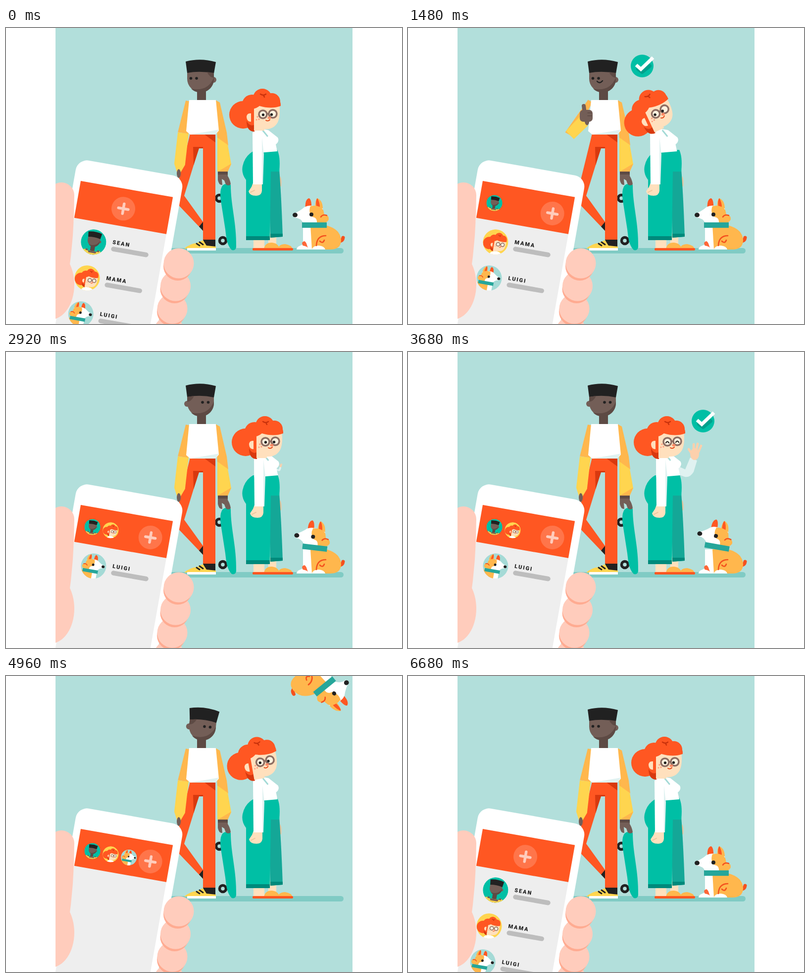
An HTML page for the animation above (6720 ms loop, 800 by 600 pixels).

```html
<!DOCTYPE html>
<html lang="en">
<head>
<meta charset="utf-8">
<title>Add to group</title>
<style>
html, body { margin: 0; width: 100%; height: 100%; overflow: hidden; background: #fff; }
svg { display: block; width: 100%; height: 100%; }
text { font: 900 11px Roboto, Arial, sans-serif; letter-spacing: 2px; fill: #212121; }
.o { fill: #ff5722 } .t { fill: #00bfa5 } .y { fill: #ffd54f } .a { fill: #ffb74d }
.w { fill: #fff } .k { fill: #212121 } .b { fill: #735e57 } .d { fill: #5d4a44 }
.s { fill: #ffe0bd } .p { fill: #ffccbc } .pale { fill: #e0f2f1 } .r { fill: #d8390f }
.line { fill: none; stroke-linecap: round; stroke-linejoin: round; }
</style>
</head>
<body>
<svg viewBox="0 0 800 600">
<defs>
  <clipPath id="panel"><path d="M100 0H700V600H100z"/></clipPath>
  <clipPath id="disc"><circle r="25.5"/></clipPath>
  <g id="tick">
    <circle class="t" r="23"/>
    <path class="line" d="M-8 6L0 12L15 0" stroke="#00a08c" stroke-width="8"/>
    <path d="M-12 -2L-2.5 6.500L22 -17" fill="none" stroke="#fff" stroke-width="7"/>
  </g>
  <g id="av0" clip-path="url(#disc)">
    <circle class="t" r="26"/>
    <g transform="scale(.46) translate(-393 -110)">
      <path class="d" d="M384 128H403V170H384z"/>
      <path class="y" d="M352 148L364 145V150H424V145L436 150V175H352z"/>
      <path class="b" d="M364 143H372L378 158H410L416 143H424V150H364z"/>
      <circle class="b" cx="420" cy="105" r="6"/><use href="#skull"/>
    </g>
  </g>
  <g id="av1" clip-path="url(#disc)">
    <circle class="y" r="26"/>
    <ellipse class="w" cx="5" cy="27" rx="13" ry="9"/>
    <use href="#momFace" transform="scale(.45) translate(-506 -167)"/>
  </g>
  <g id="av2" clip-path="url(#disc)">
    <circle r="26" fill="#a4dad6"/>
    <g transform="scale(-.62 .62) translate(-615 -382)">
      <path class="w" d="M601 400H622V440H601z"/><path class="a" d="M616 400H652V440H616z"/>
      <use href="#dogFace"/><path d="M598 394H648V405H598z" fill="#26a69a"/>
    </g>
  </g>
</defs>

<g clip-path="url(#panel)">
<path d="M100 0H700V600H100z" fill="#b2dfdb"/>
<rect x="300" y="446" width="382" height="11" rx="5.500" fill="#80cbc4"/>

<!-- Sean -->
<g>
  <g fill="#b2dfdb" stroke="#212121" stroke-width="5.500"><circle cx="431" cy="345" r="6.500"/><circle cx="438" cy="431" r="6.500"/></g>
  <path class="t" d="M434 327Q437 315 446 316L454 318C454 360 466 395 465 444Q464 452 456 450C446 440 445 425 443 408L434 350Q432 337 434 327z"/>
  <path class="b" d="M428 290H448V300Q453 308 454 317Q449 321 444 317L441 309L436 306L437 318Q430 319 428 308z"/>
  <path class="d" d="M428 290H448V297H428z"/>
  <path class="o" d="M372 214L346 320L338 348L398 411V393L360 340L390 242H398V430H423V214z"/>
  <path class="r" d="M378 241H398V244H390L379 278zM400 215H423V232z"/>
  <path class="k" d="M390 402.500L398 393V411zM398 429H423V444H403z"/>
  <path class="y" d="M360 447Q372 437 385 436L398 430L405 441L424 443V447z"/>
  <path class="w" d="M366 446H424V451H366z"/>
  <path class="line" d="M385 437L391 441M391 434L398 439" stroke="#212121" stroke-width="3"/>
  <path class="a" d="M423 146L432 151L446 212L449 238L427 224z"/>
  <path class="y" d="M427 222L448 237L455 276L448 291H427z"/>
  <path class="a" d="M428 291L455 275L448 291z"/>
  <path class="d" d="M386 122H404V148H386z"/>
  <path id="upper" class="a"/>
  <path class="w" d="M370 146H424L430 208L423 216H372L364 209z"/>
  <path class="pale" d="M373 216L430 206L423 216z"/>
  <g id="seanHead">
    <circle id="ear" class="b" cy="105" r="6"/>
    <g id="skull">
      <path class="b" d="M366 86H420V103A27 27 0 0 1 366 103z"/>
      <path class="d" d="M420 100V103A27 27 0 0 1 374 123Q408 130 420 100z"/>
      <path class="k" d="M363 68Q393 60 424 69L420 92Q393 86 366 91z"/>
    </g>
    <path id="hairR" class="d" d="M406 89L420 91V101Q411 100 406 89z"/>
    <path id="hairL" class="d" d="M380 89L366 91V101Q375 100 380 89z"/>
    <g id="eyes" class="k"><circle cx="373.500" cy="102" r="2.800"/><circle cx="385" cy="102" r="2.800"/></g>
    <path id="smile" class="line" d="M382 108Q387 114 393 107" stroke="#212121" stroke-width="2.400"/>
  </g>
  <path id="sleeve" class="y"/>
  <ellipse id="palm" class="b"/>
  <g id="fist">
    <rect class="b" x="347" y="166" width="26" height="24" rx="7"/>
    <path class="line" d="M355 158L357 172" stroke="#735e57" stroke-width="8"/>
    <path class="line" d="M363 172H371M363 178H371" stroke="#5d4a44" stroke-width="1.500"/>
  </g>
</g>

<!-- Mama -->
<g>
  <path class="s" d="M500 425H522V448H500zM530 415H546V440H530z"/>
  <path fill="#e8c39c" d="M552 300Q558 302 556 321H552z"/>
  <path fill="#14a797" d="M530 260H550Q556 330 559 423L534 425z"/>
  <path class="t" d="M499 250L548 247Q555 262 552 291H535L533 430H485V308Q475 295 478 280Q482 260 499 250z"/>
  <path fill="#00897b" d="M485 422H533V430H485zM534 417H559V423L534 425z"/>
  <path class="a" d="M521 448Q523 435 537 435Q550 436 553 448zM549 448Q551 438 564 438Q577 440 579 448z"/>
  <rect class="o" x="498" y="446" width="82" height="5" rx="2"/>
  <g id="waveArm">
    <path class="pale" d="M538 228L560 238L570 214L584 220L577 243Q570 255 559 253L540 246z"/>
    <g id="waveHand"><ellipse fill="#fcd0ac" cx="579" cy="207" rx="9" ry="12"/>
    <path class="line" d="M573 206L567 197M577 201V187M582 201L585 186M586 204L592 190" stroke="#fcd0ac" stroke-width="4.500"/></g>
  </g>
  <g id="torso">
    <path class="w" d="M500 207Q515 203 530 207L549 222Q553 230 545 236L548 250L500 254z"/>
    <path class="line" d="M519 208L528 219" stroke="#a4dad6" stroke-width="3"/>
  </g>
  <g id="momArm">
    <path class="s" d="M499 314H517V330Q516 340 505 340Q492 340 490 331L496 322z"/>
    <path class="line" d="M494 333L502 329" stroke="#f0c9a0" stroke-width="2"/>
    <path class="w" d="M498 212Q508 204 518 214L519 317H499z"/>
    <path class="pale" d="M517 222L521 256L519 317H517z"/>
  </g>
  <g id="momHead">
    <g id="momFace">
      <g class="o"><circle cx="479" cy="176" r="28"/><circle cx="497" cy="155" r="20"/><circle cx="518" cy="142" r="19"/><circle cx="537" cy="149" r="17"/>
      <path d="M484 150H504V208Q488 210 484 192z"/></g>
      <path class="r" d="M486 188Q492 201 502 196V210Q486 210 486 188z"/>
      <path class="s" d="M501 154H552Q555 178 549 191Q541 206 522 205V208H501z"/>
      <path class="o" d="M500 164Q506 163 512 158Q536 165 555 158Q556 142 538 134H505Q496 150 500 164z"/>
      <path class="s" d="M495 173Q486 172 486 181Q487 190 495 190z"/>
      <g fill="#fff3e0" stroke="#8d6e63" stroke-width="3.500"><circle cx="519" cy="175" r="8"/><circle cx="539" cy="174" r="8"/></g>
      <path class="line" d="M527 174H531" stroke="#8d6e63" stroke-width="3.500"/>
      <ellipse cx="532" cy="182" rx="3.500" ry="2.500" fill="#ff8a65"/>
      <path class="line" d="M525 187Q529 190 533 186" stroke="#e64a19" stroke-width="2"/>
      <g fill="#ff9e80"><circle cx="508" cy="180" r="1.700"/><circle cx="511" cy="185" r="1.700"/><circle cx="506" cy="186" r="1.500"/></g>
      <path class="line" d="M514 134Q520 138 525 134M520 136L522 140" stroke="#c9320c" stroke-width="2.500"/>
    </g>
    <g id="pupils" class="k"><circle cx="519.500" cy="176" r="2.700"/><circle cx="536.500" cy="175.500" r="2.700"/></g>
    <path id="happy" class="line" d="M516 177Q519 172 522 177M536 176Q539 171 542 176" stroke="#212121" stroke-width="2.200"/>
  </g>
</g>

<!-- Luigi -->
<g id="dog">
  <path class="line" d="M670 432Q680 433 681 425" stroke="#f4511e" stroke-width="7"/>
  <path class="w" d="M600 400H622V449H590Q590 441 600 439z"/>
  <path class="a" d="M615 400H647Q676 408 677 430Q677 449 655 449H618z"/>
  <path class="o" d="M598 436Q603 428 607 437L611 449H602z" opacity=".9"/>
  <path class="w" d="M587 449Q588 441 599 441Q610 442 612 449zM618 449Q620 441 632 441Q643 442 645 449z"/>
  <path class="line" d="M627 441Q628 421 646 421M634 432Q640 438 643 430" stroke="#f4511e" stroke-width="2.600"/>
  <g id="dogHead">
    <g id="dogFace">
      <path class="o" d="M605 368Q603 348 612 345Q618 347 617 368z"/>
      <path class="a" d="M624 366Q625 347 629 345Q641 350 640 370z"/>
      <path class="o" d="M627 362Q625 348 629 345Q634 353 634 364z"/>
      <path class="w" d="M580 377Q594 371 603 363Q612 358 622 361L640 366V396H601Q596 385 582 384z"/>
      <path class="a" d="M615 361Q634 358 641 369L643 378Q653 380 652 388Q649 395 640 396H628Q629 384 619 383Q610 374 615 361z"/>
      <path class="line" d="M636 383Q640 377 648 380" stroke="#f4511e" stroke-width="2.600"/>
      <ellipse class="k" cx="584" cy="379" rx="5" ry="4.500"/><circle class="k" cx="617" cy="378" r="4"/>
    </g>
    <path d="M598 394H648V405H598z" fill="#26a69a"/>
  </g>
</g>

<use id="tick0" href="#tick"/><use id="tick1" href="#tick"/><use id="tick2" href="#tick"/>

<!-- Phone -->
<g id="phone">
  <rect class="w" x="-14" y="-43.500" width="218.500" height="480" rx="23"/>
  <path d="M0 0H189V400H0z" fill="#eee"/>
  <path id="slot" d="M0 76H189V157H0z" fill="#cfcfcf"/>
  <g id="rows"></g>
  <path class="o" d="M0 0H189V76H0z"/>
  <path id="glow" class="w" d="M0 0H189V76H0z"/>
  <g id="plus">
    <circle class="w" r="24" opacity=".18"/>
    <circle id="pressed" r="26" fill="#ff4a17"/>
    <path id="cross" class="line" d="M-10 0H10M0 -10V10" stroke-width="5.500"/>
  </g>
  <g id="drags"></g>
</g>
<ellipse class="p" cx="90" cy="520" rx="48" ry="71"/>
<path id="thumb" class="line" stroke="#ffccbc" stroke-width="52"/>
<g id="fingers"></g>
</g>
</svg>

<script>
const LOOP = 6720, CYCLE = 2040, RESET = 6180;
const $ = id => document.getElementById(id);
const set = (id, attrs) => { for (const k in attrs) $(id).setAttribute(k, attrs[k]); };
const move = (id, value) => set(id, { transform: value });
const show = (id, on) => set(id, { opacity: +on });
const ease = x => (x = Math.min(1, Math.max(0, x)), x * x * (3 - 2 * x));
const mix = (a, b, p) => a.map((v, i) => v + (b[i] - v) * p);

// Starts at a pose, then eases to each next one: [start, duration, pose].
const poseAt = (t, first, ...steps) =>
  steps.reduce((pose, [at, span, next]) => mix(pose, next, ease((t - at) / span)), first);
// Same for a single number.
const valueAt = (t, first, ...steps) =>
  poseAt(t, [first], ...steps.map(([at, span, v]) => [at, span, [v]]))[0];

const names = ['SEAN', 'MAMA', 'LUIGI'];
$('rows').innerHTML = names.map((name, i) => `<g id="row${i}">
  <use href="#av${i}" x="47"/><text x="85" y="-3">${name}</text>
  <path class="line" d="M89 7H156" stroke="#bdbdbd" stroke-width="9.500"/></g>`).join('');
$('drags').innerHTML = names.map((n, i) => `<use id="drag${i}" href="#av${i}"/>`).join('');

// Fingers stack from the lowest up, each shading the one below.
for (let i = 3; i >= 0; i--) {
  const x = 349 - 6.5 * i, y = 477 + 46 * i;
  $('fingers').innerHTML += `<circle cx="${x - 2}" cy="${y + 6}" r="29" fill="#ffab91"/>
    <circle class="p" cx="${x}" cy="${y}" r="30.500"/>`;
}

// Outline of a limb from a to b, given [position along, half width] stations.
function limb([ax, ay], [bx, by], stations) {
  const len = Math.hypot(bx - ax, by - ay), nx = (ay - by) / len, ny = (bx - ax) / len;
  const side = sign => stations.map(([p, w]) =>
    `${ax + (bx - ax) * p + nx * w * sign} ${ay + (by - ay) * p + ny * w * sign}`);
  return 'M' + [...side(1), ...side(-1).reverse()].join('L') + 'z';
}

function drawSean(t) {
  const turn = valueAt(t, 0, [2560, 200, 1], [6220, 200, 0]);
  const tilt = valueAt(t, 0, [4150, 200, 6], [5000, 400, 7.5], [6200, 220, 0]);
  move('seanHead', `rotate(${tilt} 395 140)`);
  move('eyes', `translate(${turn * 23.5} 0)`);
  set('ear', { cx: 419 - turn * 53 });
  show('hairR', turn < .5);
  show('hairL', turn >= .5);
  show('smile', t > 800 && t < 2600);

  // elbow x, y, wrist x, y, how far the palm faces us
  const down = [358, 213, 349, 292, 0], swing = [349, 231, 396, 236, 1], up = [327, 217, 361, 183, .1];
  const [ex, ey, wx, wy, open] = poseAt(t, down, [700, 120, swing], [820, 160, up],
    [2250, 130, swing], [2410, 150, down]);
  set('upper', { d: limb([368, 148], [ex, ey], [[0, 5], [1, 11]]) });
  set('sleeve', { d: limb([ex, ey], [wx, wy], [[0, 11 + open * 5], [.8, 11 + open * 12], [1, 4 + open * 12]]) });
  set('palm', { cx: wx + 4 * open, cy: wy + 3, rx: 4 + 10 * open, ry: 9 + 23 * open,
    transform: `rotate(${-17 * open} ${wx} ${wy})` });
  show('fist', t > 930 && t < 2290);
}

function drawMama(t) {
  // head x, y, turn, then arm x, y
  const rest = [0, 0, 0, 0, 0], atSean = [-5, 0, -25, -9, 0], waving = [5, 7, 0, 3, -4];
  const lookUp = [0, 1, -10, 1, 0], atDog = [9, 5, 11, 3, 2];
  const [x, y, r, ax, ay] = poseAt(t, rest, [700, 250, atSean], [2560, 240, waving],
    [4500, 220, lookUp], [5000, 300, atDog], [6000, 300, rest]);
  move('momHead', `translate(${x} ${y}) rotate(${r} 510 205)`);
  move('momArm', `translate(${ax} ${ay})`);
  move('torso', `translate(${ax * .5} 0)`);
  const happy = t > 2950 && t < 4540;
  show('happy', happy);
  show('pupils', !happy);
  move('pupils', `translate(${r / 10} ${Math.max(0, r / 10)})`);

  const grow = valueAt(t, 0, [2850, 230, 1], [4480, 170, 0]);
  const wave = 12 * Math.sin((t - 3680) / 760 * 6 * Math.PI);
  move('waveArm', `translate(548 238) scale(${grow}) translate(-548 -238)`);
  move('waveHand', `rotate(${wave} 577 218)`);
}

function drawDog(t) {
  const p = Math.min(1, Math.max(0, (t - 4520) / 800));
  const rise = 1520 * p * (1 - p);
  const spin = -360 * ease((t - 4640) / 560);
  const stretch = valueAt(t, 1, [4200, 150, .96], [4480, 100, 1.08], [5220, 130, .88], [5350, 120, 1]);
  move('dog', `translate(0 ${-rise}) rotate(${spin} 633 400)
    translate(633 449) scale(1 ${stretch}) translate(-633 -449)`);
  const [x, y, r] = poseAt(t, [0, 0, 0], [2800, 200, [2, -4, 10]], [4180, 160, [2, 0, 0]], [4400, 200, [0, 0, 0]]);
  move('dogHead', `translate(${x} ${y}) rotate(${r} 625 395)`);
}

function drawTicks(t) {
  [[1150, 473, 77], [3250, 596, 140], [5340, 629, 284]].forEach(([at, x, y], i) => {
    const s = valueAt(t - at, 0, [0, 160, 1.15], [160, 100, 1], [620, 80, 1.15], [700, 150, 0]);
    move('tick' + i, `translate(${x} ${y}) scale(${s})`);
  });
}

function drawPhone(t) {
  const u = t - CYCLE * Math.min(2, Math.floor(t / CYCLE));
  const press = valueAt(u, 0, [140, 180, 1], [460, 160, 0]);
  const back = ease((t - RESET) / 340), isReset = t >= RESET;

  move('phone', `translate(151 ${310 + press}) rotate(10)`);
  set('glow', { opacity: press * .16 });
  set('slot', { opacity: press * .5 });
  set('pressed', { opacity: press });
  set('cross', { stroke: press > .5 ? '#fff' : '#ffccbc' });
  const plusX = valueAt(t, 94.5, [160, 180, 150], [RESET, 300, 94.5]);
  move('plus', `translate(${plusX} 40.500)`);

  const shift = names.reduce((sum, n, i) => sum + ease((t - i * CYCLE - 560) / 300), 0);
  names.forEach((n, i) => {
    const v = t - i * CYCLE;
    const fade = valueAt(v, 1, [140, 210, .28], [420, 140, 0]);
    const y = 117.5 + 74 * (isReset ? i + (1 - back) * .7 : i - shift);
    set('row' + i, { opacity: isReset ? back : fade, transform: `translate(0 ${y})` });
    const [x, dy, scale, alpha] = poseAt(v, [47, 117.5, 1, 1],
      [150, 190, [86 + 9 * i, 57 - 7 * i, 1.24, .65]], [440, 200, [31 + 37.4 * i, 40, .63, 1]]);
    const size = scale * (1 - ease((t - RESET) / 200));
    set('drag' + i, { opacity: v > 130 ? alpha : 0, transform: `translate(${x} ${dy}) scale(${size})` });
  });

  // tip x, y, bend x, y, base x
  const rest = [112, 339, 112, 420, 100], onRow = [175, 437, 125, 430, 112], onHeader = [219, 375, 130, 398, 120];
  const [tx, ty, bx, by, base] = poseAt(u, rest, [0, 150, onRow], [150, 190, onHeader], [460, 240, rest]);
  set('thumb', { d: `M${base} 500Q${bx} ${by} ${tx} ${ty}` });
}

const start = performance.now();
function frame() {
  const t = (performance.now() - start) % LOOP;
  [drawSean, drawMama, drawDog, drawTicks, drawPhone].forEach(draw => draw(t));
  requestAnimationFrame(frame);
}
frame();
</script>
</body>
</html>
```
